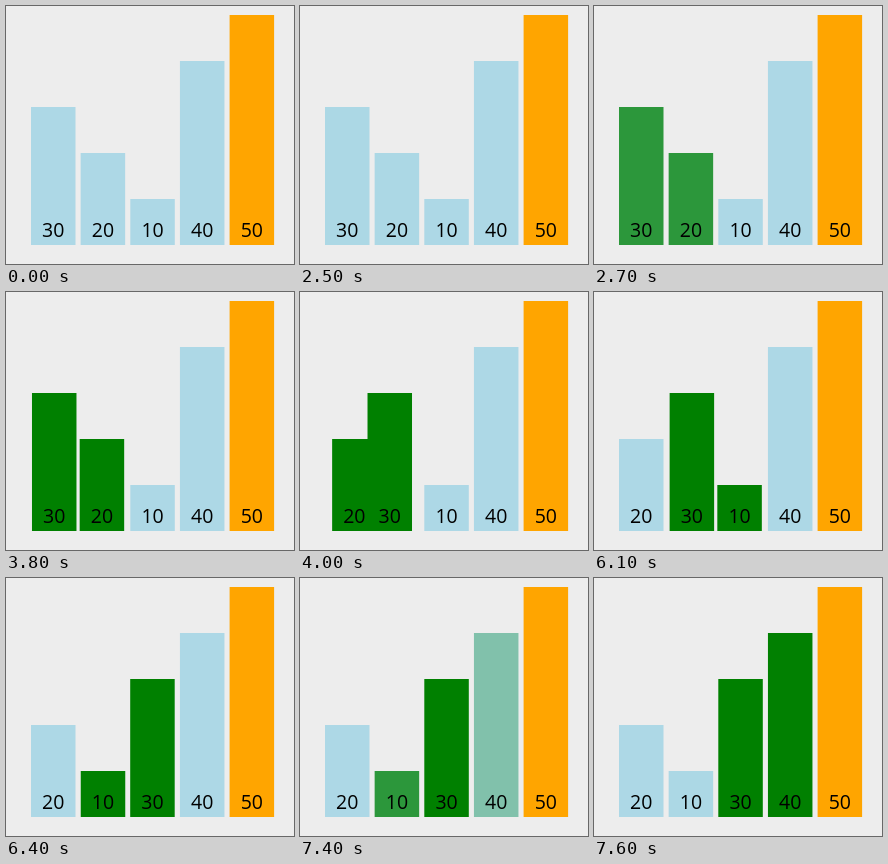
Animation of 288x258 px, one loop 8000 ms. Source, as an HTML page:

```html
<!DOCTYPE html>
<html lang="en">
<head>
<meta charset="utf-8">
<title>Bubble sort</title>
<style>
  html, body { margin: 0; width: 100%; height: 100%; overflow: hidden; background: #ededed; }
  svg { display: block; }
  text { font: 19.5px "Open Sans", "Noto Sans", sans-serif; text-anchor: middle; }
</style>
</head>
<body>
<svg id="stage" width="288" height="258" viewBox="0 0 288 258"></svg>
<script>
const LOOP = 8000, TICK = 100, DURATION = 400;
const LEFT = 25, PITCH = 49.65, WIDTH = 44.5, BASE = 239, UNIT = 4.6;
const BLUE = [173, 216, 230], GREEN = [0, 128, 0], ORANGE = [255, 165, 0];

// Each step moves bars to slots or fades them to colours, keyed by value.
const steps = [
  { at: 2460, color: { 30: GREEN, 20: GREEN } },
  { at: 3732, slot: { 30: 1, 20: 0 } },
  { at: 4900, color: { 20: BLUE, 10: GREEN } },
  { at: 6032, slot: { 30: 2, 10: 1 } },
  { at: 7240, color: { 10: BLUE, 40: GREEN } },
];

const stage = document.getElementById('stage');
function add(tag, attrs) {
  const node = document.createElementNS('http://www.w3.org/2000/svg', tag);
  for (const key in attrs) node.setAttribute(key, attrs[key]);
  return stage.appendChild(node);
}

const bars = [30, 20, 10, 40, 50].map((value, slot) => ({
  value, slot,
  color: value === 50 ? ORANGE : BLUE,
  rect: add('rect', { y: BASE - value * UNIT, width: WIDTH, height: value * UNIT }),
}));
for (const bar of bars) {
  bar.label = add('text', { y: 231 });
  bar.label.textContent = bar.value;
}

const mix = (a, b, k) => a + (b - a) * k;
const cubicInOut = t => t < 0.5 ? 4 * t ** 3 : 1 - 4 * (1 - t) ** 3;

function draw(time) {
  for (const { value, slot, color, rect, label } of bars) {
    let place = slot, fill = color;
    for (const step of steps) {
      const k = cubicInOut(Math.min(1, Math.max(0, (time - step.at) / DURATION)));
      if (step.slot && value in step.slot) place = mix(place, step.slot[value], k);
      if (step.color && value in step.color) {
        fill = fill.map((c, i) => mix(c, step.color[value][i], k));
      }
    }
    const x = LEFT + place * PITCH;
    rect.setAttribute('x', x);
    rect.setAttribute('fill', `rgb(${fill.map(Math.round)})`);
    label.setAttribute('x', x + WIDTH / 2);
  }
}

const start = performance.now();
function frame() {
  const time = (performance.now() - start) % LOOP;
  draw(Math.floor(time / TICK) * TICK);
  requestAnimationFrame(frame);
}
frame();
</script>
</body>
</html>
```
